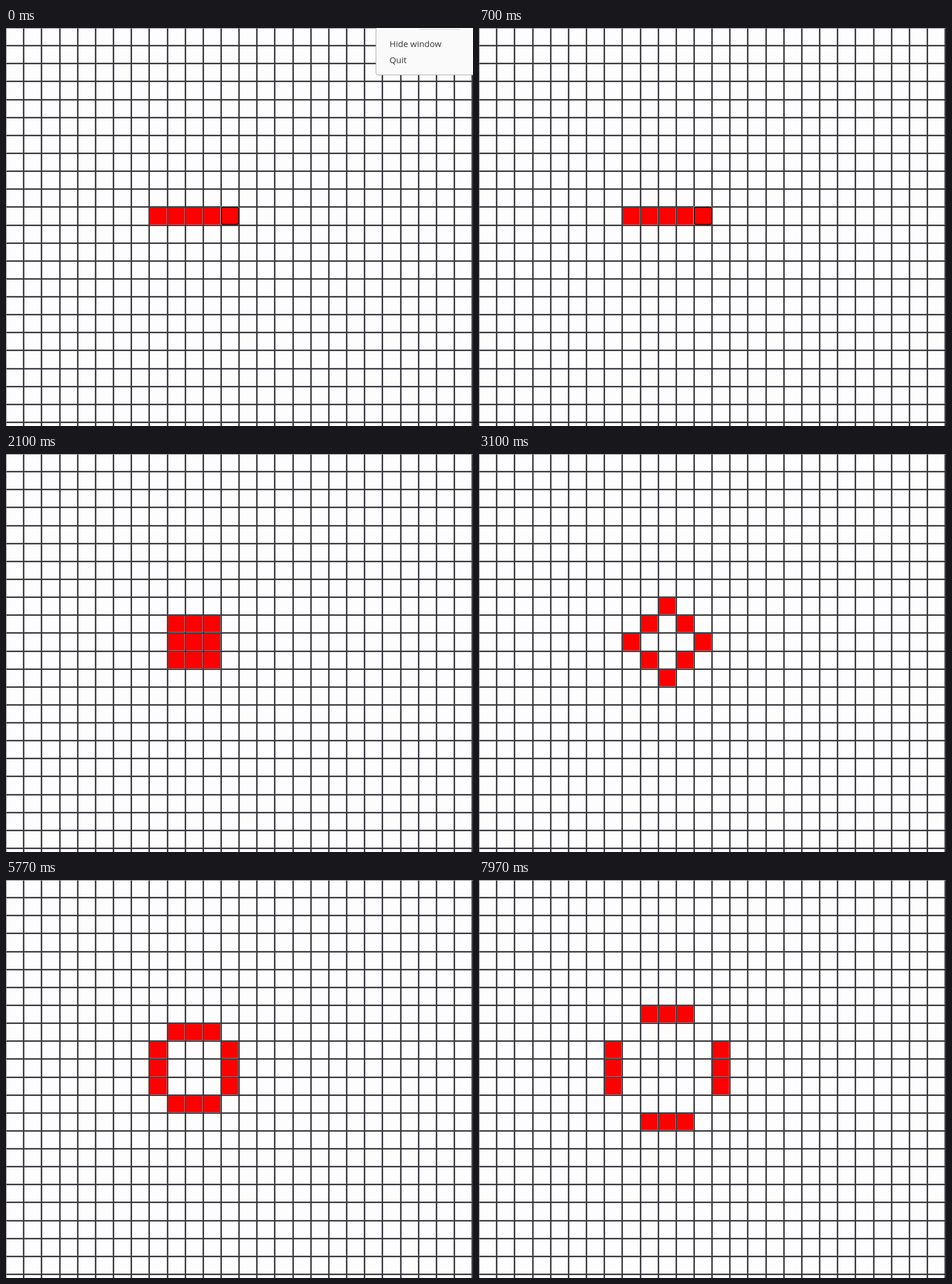
An HTML page with a canvas for the animation above (8000 ms loop, 811x691 px).

```html
<!DOCTYPE html>
<html lang="en">
<head>
<meta charset="utf-8">
<title>Game of Life</title>
<style>
  html, body { margin: 0; width: 100%; height: 100%; overflow: hidden; background: #fdfdfd; }
  #stage { position: absolute; left: 0; top: 0; width: 811px; height: 691px; overflow: hidden; }
  canvas { display: block; }
  #menu {
    position: absolute; right: 0; top: 0; width: 169px; height: 82px;
    box-sizing: border-box; background: #fafafa;
    border: solid #aaa9a4; border-width: 0 0 1px 1px; border-bottom-left-radius: 5px;
    color: #363636; font: 14.9px/28px "Open Sans", "Noto Sans", sans-serif;
  }
  #menu hr { position: absolute; left: 75px; top: 2px; width: 71px; height: 1px; margin: 0; border: 0; background: #d5d5cc; }
  #menu span { position: absolute; left: 23px; white-space: nowrap; }
  #hide { top: 13px; }
  #quit { top: 41px; }
</style>
</head>
<body>
<div id="stage">
  <canvas id="board" width="811" height="691"></canvas>
  <div id="menu"><hr><span id="hide">Hide window</span><span id="quit">Quit</span></div>
</div>
<script>
const LOOP = 8000, FIRST_STEP = 1750, STEP = 1100;
const MENU_FADE = [30, 200], FOCUS_END = 800;
const COLS = 27, ROWS = 23, W = 811, H = 691;
const ctx = document.getElementById('board').getContext('2d');
const menu = document.getElementById('menu');

const colEdge = k => Math.round(31.157 * k - 0.9);
const rowEdge = k => Math.round(31.13 * k - 0.9);
const has = (cells, x, y) => cells.has(y * COLS + x);

function evolve(cells) {
  const next = new Set();
  for (let y = 1; y < ROWS - 1; y++) {
    for (let x = 1; x < COLS - 1; x++) {
      let n = 0;
      for (let dy = -1; dy <= 1; dy++)
        for (let dx = -1; dx <= 1; dx++)
          if ((dx || dy) && has(cells, x + dx, y + dy)) n++;
      if (n === 3 || (n === 2 && has(cells, x, y))) next.add(y * COLS + x);
    }
  }
  return next;
}

const generations = [new Set([8, 9, 10, 11, 12].map(x => 10 * COLS + x))];
while (generations.length < 7) generations.push(evolve(generations.at(-1)));

function box(color, x, y, w, h) {
  ctx.fillStyle = color;
  ctx.fillRect(x, y, w, h);
}

function drawGrid() {
  box('#fdfdfd', 0, 0, W, H);
  // A dark core with a soft edge on each line.
  for (const [offset, color] of [[-1, '#8c8c92'], [1, '#525258'], [0, '#242428']]) {
    for (let k = 1; k < COLS; k++) box(color, colEdge(k) + offset, 0, 1, H);
    for (let k = 1; k < ROWS; k++) box(color, 0, rowEdge(k) + offset, W, 1);
  }
  box('#85858c', 0, 0, W, 1);
  box('#85858c', 0, 0, 1, H);
}

function drawCells(cells) {
  for (const i of cells) {
    const col = i % COLS, row = Math.floor(i / COLS);
    const x = colEdge(col) + 2, y = rowEdge(row) + 2;
    box('#fe0000', x, y, colEdge(col + 1) - 1 - x, rowEdge(row + 1) - 1 - y);
  }
}

function ring(color, x, y, size, width) {
  ctx.strokeStyle = color;
  ctx.lineWidth = width;
  ctx.beginPath();
  ctx.roundRect(x, y, size, size, 3);
  ctx.stroke();
}

function drawFocus(col, row) {
  const x = colEdge(col), y = rowEdge(row);
  ring('#c8c8c8', x - 0.5, y - 0.5, 32, 1);
  ring('#180000', x + 1, y + 1, 30, 1.6);
}

function render(t) {
  const gen = Math.max(0, Math.floor((t - FIRST_STEP) / STEP) + 1);
  drawGrid();
  drawCells(generations[Math.min(gen, generations.length - 1)]);
  if (t < FOCUS_END) drawFocus(12, 10);
  const [from, to] = MENU_FADE;
  menu.style.opacity = Math.min(1, Math.max(0, (to - t) / (to - from)));
}

const start = performance.now();
function tick() {
  render((performance.now() - start) % LOOP);
  requestAnimationFrame(tick);
}
render(0);
requestAnimationFrame(tick);
</script>
</body>
</html>
```
